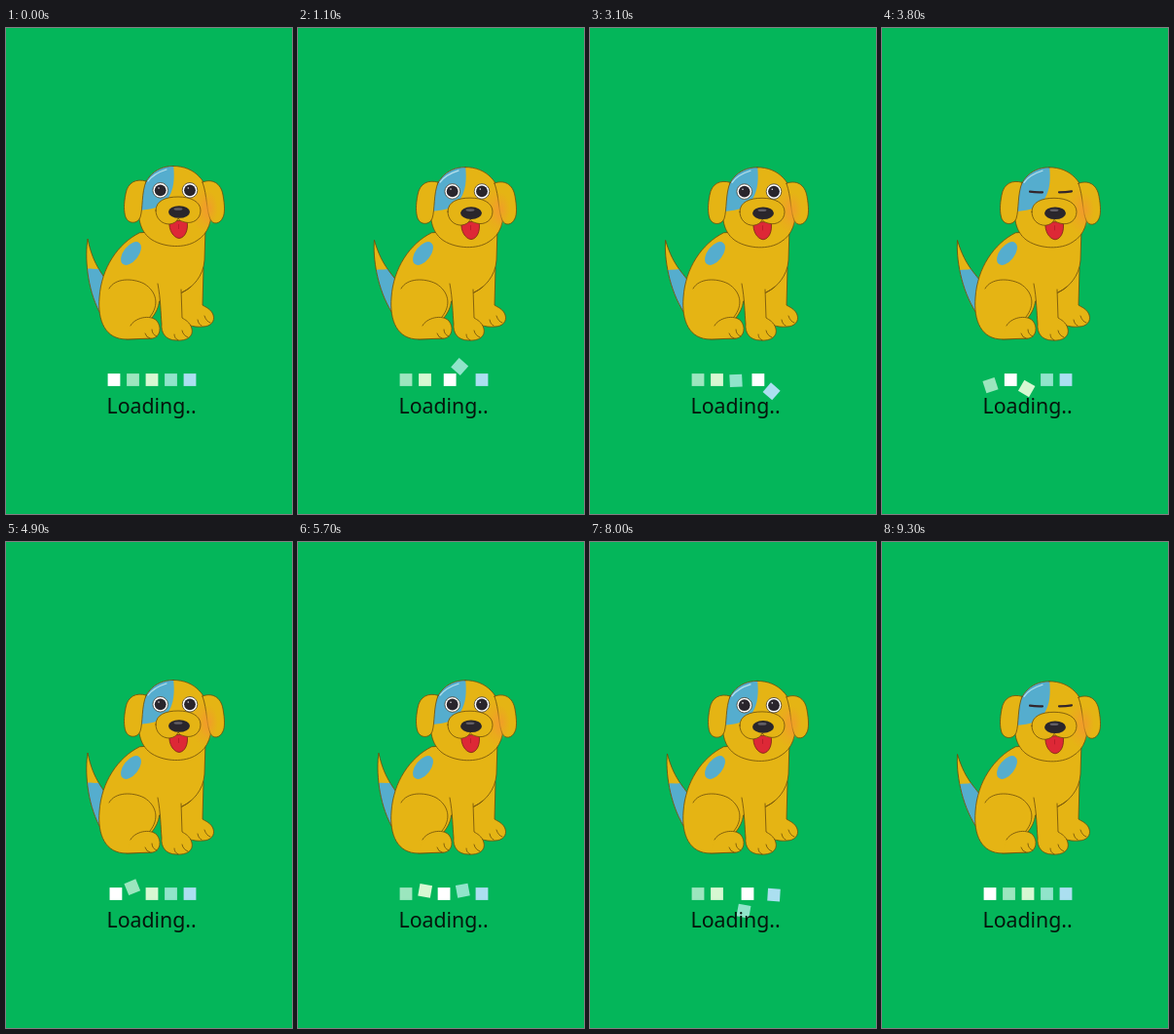
Recreate the animation shown at these times as an HTML page. Size 294x498 px, loop 9.4 s.

```html
<!DOCTYPE html>
<html lang="en">
<head>
<meta charset="utf-8">
<title>Loading</title>
<style>
  html, body { margin: 0; width: 100%; height: 100%; overflow: hidden; background: #04b65a; }
  svg { display: block; width: 294px; height: 498px; }
  .line { stroke: #6d4d0c; stroke-width: .8; stroke-linecap: round; stroke-linejoin: round; }
  .fur { fill: #e5b414; }
  .blue { fill: #55adce; }
  .none { fill: none; }
  text { font: 21.3px "Noto Sans", "Open Sans", sans-serif; fill: #06150c; }
</style>
</head>
<body>
<svg viewBox="0 0 294 498">
  <defs>
    <path id="skullShape" d="M172 141.500C151 141.500 140 157 138 178C134 196 139 210 150 217C163 225 184 226 196 218C208 211 213 197 210 180C208 157 194 141.500 172 141.500Z"/>
    <clipPath id="skull"><use href="#skullShape"/></clipPath>
    <clipPath id="tailShape"><path d="M84 216C81 234 83 266 96 291L108 268C101 252 90 246 84 216Z"/></clipPath>
    <radialGradient id="blush">
      <stop offset="0" stop-color="#f29a2c" stop-opacity=".8"/>
      <stop offset="1" stop-color="#f29a2c" stop-opacity="0"/>
    </radialGradient>
  </defs>

  <g id="tail">
    <g clip-path="url(#tailShape)">
      <rect class="fur" x="76" y="212" width="36" height="82"/>
      <path class="blue" d="M78 247L86 246.500L92 247L112 245V294H78Z"/>
    </g>
    <path class="line none" d="M108 268C101 252 90 246 84 216C81 234 83 266 96 291"/>
  </g>

  <g class="line fur">
    <path d="M178 262V297C184 304 192 307 202 306C211 306 215 300 213 294C211 288 205 286 202 284L203 246Z"/>
    <path d="M137 210C115 221 98 246 96 276C94 300 102 319 124 319L150 318V297C154 292 157 286 157.500 280L181 271C192 266 203 254 204 238L205 205Z"/>
    <path d="M156 262C159 278 159 292 160 303C159 312 164 320 175 320C186 321 193 316 191 308C189 301 184 299 181 297L180 268"/>
    <path d="M128 305C132 297 148 293 155 300C160 306 159 316 151 318L124 319"/>
    <path class="none" d="M106 267C112 256 130 256 142 262C155 270 158 284 148 296M181 271C184 269 187 268 190 265"/>
    <path class="none" d="M143 313Q144 317 148 318M150 309Q150 314 155 316M173 314Q173 318 177 320M181 310Q182 315 187 317M197 299Q198 304 201 305M204 295Q206 301 210 302"/>
  </g>
  <ellipse class="blue" cx="128.500" cy="231" rx="7.700" ry="13.800" transform="rotate(38 128.500 231)"/>

  <g id="head">
    <g clip-path="url(#skull)">
      <rect class="fur" x="134" y="140" width="80" height="86"/>
      <path class="blue" d="M172 140C174 156 172 170 163 179C156 185 147 186 134 187V140Z"/>
      <ellipse cx="207" cy="185" rx="18" ry="26" fill="url(#blush)"/>
    </g>
    <use href="#skullShape" class="line none"/>
    <path d="M146 157Q152 149 165 145" class="none" stroke="#b9e2ee" stroke-width="1.200" stroke-linecap="round"/>
    <path class="line fur" d="M144 157C134 154 125 158 123 170C121 180 121 188 123 194C126 201 135 201 138 194C141 184 139 170 144 157Z"/>
    <path class="line fur" d="M202 158C212 154 221 159 223 171C225 182 225 190 223 194C220 201 213 202 210 196C206 187 207 172 202 158Z"/>
    <ellipse cx="209" cy="185" rx="9" ry="18" fill="url(#blush)"/>
    <path d="M168 198C167 207 172 215 178 215.500C184 215 188 207 186 197Z" fill="#dd2836" stroke="#6b1a14" stroke-width=".7"/>
    <path d="M177.500 201V206" class="none" stroke="#b51a28" stroke-width=".8"/>
    <path class="line fur" d="M154 187C154 177 164 173 177 173C190 173 200 178 200 187C200 196 192 201 184 199Q178 198 177 195Q175 200 168 201C160 201 154 195 154 187Z"/>
    <ellipse cx="178" cy="188.500" rx="11" ry="6.300" fill="#2a262c"/>
    <ellipse cx="177" cy="185.500" rx="4.500" ry="1.300" fill="#625e66"/>
    <g id="open">
      <g fill="#fff" stroke="#4a4030" stroke-width=".8">
        <circle cx="158.700" cy="166.300" r="7.800"/><circle cx="189" cy="166.300" r="7.800"/>
      </g>
      <g fill="#29252c">
        <circle cx="158.700" cy="166.300" r="5.900"/><circle cx="189" cy="166.300" r="5.900"/>
      </g>
      <g fill="#d8d6da">
        <circle cx="157" cy="164" r=".8"/><circle cx="187.300" cy="164" r=".8"/>
      </g>
    </g>
    <path id="shut" d="M152 166.300Q158 167.300 165 167M182 167Q189 167 195 166" class="none" stroke="#33262c" stroke-width="2.200" stroke-linecap="round"/>
  </g>

  <g id="squares"></g>
  <text x="103.500" y="395">Loading..</text>
</svg>
<script>
const LOOP = 9400, CYCLE = 4700, TRAVEL = 2000, BACK = 2500;
const WAG = 687.5, BLINK = 1375;
const LEFT = 111, STEP = 19.5, ROW = 360.5, LIFT = 18;
const HOPS = [[0, .44], [.28, .54], [.46, .72], [.56, 1]];
const COLORS = ['#9be6be', '#d7f8d2', '#90e4ca', '#abdff0', '#ffffff'];

const $ = id => document.getElementById(id);
const clamp = v => Math.min(1, Math.max(0, v));
const ease = v => (1 - Math.cos(Math.PI * clamp(v))) / 2;

const squares = COLORS.map(color => {
  const r = document.createElementNS('http://www.w3.org/2000/svg', 'rect');
  const attrs = { x: -6.4, y: -6.4, width: 12.8, height: 12.8, fill: color };
  for (const key in attrs) r.setAttribute(key, attrs[key]);
  return $('squares').appendChild(r);
});

function place(el, x, y, angle) {
  el.setAttribute('transform', `translate(${x} ${y}) rotate(${angle})`);
}

// White slides along the row; the others swing over it, then back under it.
function drawSquares(t) {
  const back = t >= BACK;
  const p = clamp((back ? t - BACK : t) / TRAVEL);
  const slide = back ? 1 - ease(p) : ease(p);
  place(squares[4], LEFT + 4 * STEP * slide, ROW, 0);
  for (let i = 0; i < 4; i++) {
    const [from, to] = HOPS[back ? 3 - i : i];
    const a = Math.PI * (ease((p - from) / (to - from)) + (back ? 1 : 0));
    const mid = LEFT + (i + .5) * STEP;
    place(squares[i], mid + STEP / 2 * Math.cos(a), ROW - LIFT * Math.sin(a), -a * 180 / Math.PI);
  }
}

function drawDog(t) {
  const wag = Math.cos(Math.PI * (t / WAG - .53)) ** 6;
  $('tail').setAttribute('transform', `rotate(${-5.2 * wag} 97 288)`);
  $('head').setAttribute('transform', `translate(0 ${1.3 * wag})`);
  const phase = t % BLINK / BLINK;
  const shut = phase > .74 && phase < .8;
  $('open').style.display = shut ? 'none' : '';
  $('shut').style.display = shut ? '' : 'none';
}

function frame() {
  const t = performance.now() % LOOP;
  drawSquares(t % CYCLE);
  drawDog(t);
  requestAnimationFrame(frame);
}
frame();
</script>
</body>
</html>
```
